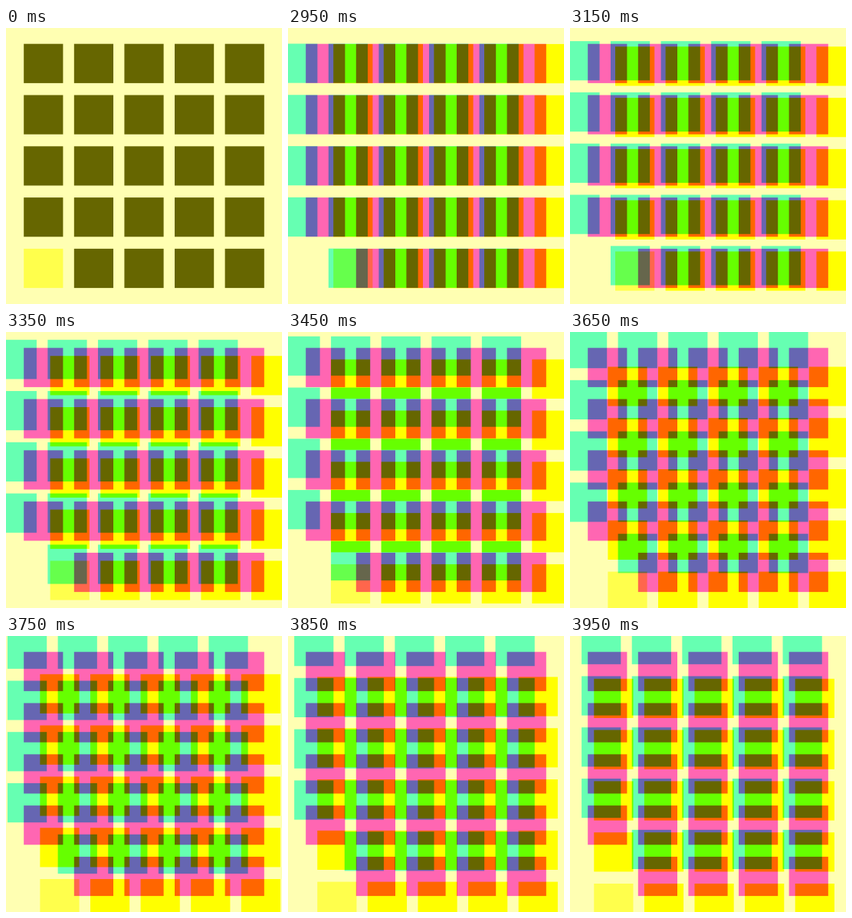
Write an HTML page with a canvas that moves like this. It is 360 px wide and 360 px high and loops after 4 s.

```html
<!DOCTYPE html>
<html>
<head>
<meta charset="utf-8">
<style>
  html, body { margin: 0; width: 100%; height: 100%; overflow: hidden; background: #ffffb2; }
  canvas { display: block; }
</style>
</head>
<body>
<canvas id="stage" width="360" height="360"></canvas>
<script>
const ctx = document.getElementById('stage').getContext('2d');
const LOOP = 4000, HOLD = 2950, STEP = 50;
const LEFT = 23.2, TOP = 20.7, PITCH_X = 65.6, PITCH_Y = 66.8, SIZE = 51.2, RADIUS = 36;

// One ink layer; the bottom-left cell has its own ink, or none.
function grid(dx, dy, ink, cornerInk) {
  for (let row = 0; row < 5; row++) {
    for (let col = 0; col < 5; col++) {
      const fill = row === 4 && col === 0 ? cornerInk : ink;
      if (!fill) continue;
      ctx.fillStyle = fill;
      ctx.fillRect(LEFT + col * PITCH_X + dx, TOP + row * PITCH_Y + dy, SIZE, SIZE);
    }
  }
}

function draw(time) {
  let dx = 0, dy = 0;
  if (time >= HOLD) {
    // The inks jump apart, then swing round a circle with a sine ease.
    const step = Math.floor((time - HOLD) / STEP);
    const angle = Math.PI * Math.sin(0.0334 * (step + 1.35)) ** 2;
    dx = RADIUS * Math.cos(angle);
    dy = RADIUS * Math.sin(angle);
  }
  ctx.globalCompositeOperation = 'source-over';
  ctx.fillStyle = '#ffffb2';
  ctx.fillRect(0, 0, 360, 360);
  ctx.globalCompositeOperation = 'multiply';
  grid(-dx, -dy, '#66ffff');
  grid(0, 0, '#ff66ff');
  grid(dx, dy, '#ffff00', '#ffff6d');
}

const start = performance.now();
function tick() {
  draw((performance.now() - start) % LOOP);
  requestAnimationFrame(tick);
}
tick();
</script>
</body>
</html>
```
